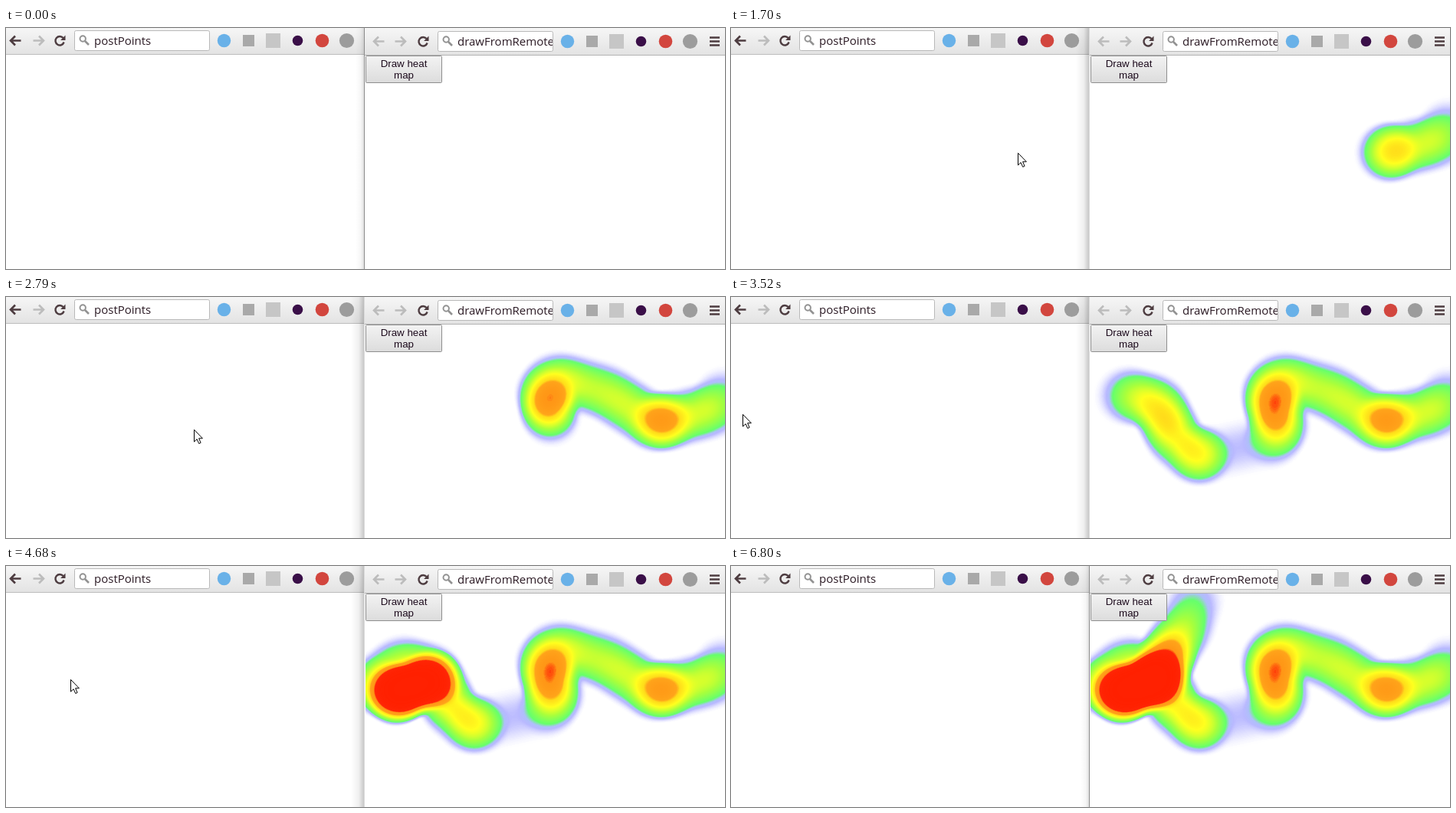
An HTML page with a canvas that plays this animation: 938x315 px, repeating every 6.88 s.

```html
<!DOCTYPE html>
<html lang="en">
<head>
<meta charset="utf-8">
<title>Heat map demo</title>
<style>
  html, body { margin: 0; width: 100%; height: 100%; overflow: hidden; background: #fff; }
  #stage { position: relative; width: 938px; height: 315px; overflow: hidden; }
  #heat { position: absolute; left: 469px; top: 36px; }
  svg { position: absolute; left: 0; top: 0; display: block; }
  .url { font: 15px "Open Sans", "Noto Sans", sans-serif; fill: #2b1a24; }
  .label { font: 13.33px "Liberation Sans", Arial, sans-serif; fill: #1c0a1c; text-anchor: middle; }
  .dark { color: #4d3c40; }
  .dim { color: #bcbcbc; }
  #button rect { fill: url(#face); stroke: #8e8e8e; }
  #button.hover rect { fill: url(#lit); stroke: #777; }
  #button.active rect { fill: #d9d9d9; stroke: #777; }
</style>
</head>
<body>
<div id="stage">
  <canvas id="heat" width="469" height="279"></canvas>
  <svg width="938" height="315" viewBox="0 0 938 315">
    <defs>
      <linearGradient id="bar" x2="0" y2="1">
        <stop stop-color="#f6f6f6"/><stop offset="1" stop-color="#e3e3e3"/>
      </linearGradient>
      <linearGradient id="face" x2="0" y2="1">
        <stop stop-color="#f3f3f3"/><stop offset="1" stop-color="#dcdcdc"/>
      </linearGradient>
      <linearGradient id="lit" x2="0" y2="1">
        <stop stop-color="#f8f8f8"/><stop offset="1" stop-color="#e4e4e4"/>
      </linearGradient>
      <linearGradient id="shade">
        <stop stop-color="#000" stop-opacity="0"/>
        <stop offset=".6" stop-color="#000" stop-opacity=".06"/>
        <stop offset="1" stop-color="#000" stop-opacity=".22"/>
      </linearGradient>
      <clipPath id="field"><rect x="564" y="5" width="149" height="26"/></clipPath>
      <g id="arrow" fill="none" stroke="currentColor" stroke-width="2.6">
        <path d="M7.5 0H-6M0 -6L-6 0L0 6"/>
      </g>
      <g id="reload" fill="none" stroke="currentColor" stroke-width="2.4">
        <path d="M4.6 -3.4A5.7 5.7 0 1 0 5.6 2"/>
        <path d="M7.5 -7V-.6H1.1Z" fill="currentColor" stroke="none"/>
      </g>
      <g id="lens" fill="none" stroke="#929292" stroke-width="2">
        <circle cx="-1.8" cy="-2" r="3.7"/><path d="M1 1L6 6" stroke-width="2.6"/>
      </g>
      <g id="extras">
        <circle cx="284.5" cy="16.5" r="8.7" fill="#69b1e8"/>
        <rect x="309" y="9" width="15" height="15" fill="#a9a9a9"/>
        <rect x="339" y="7" width="19" height="19" fill="#c6c6c6"/>
        <circle cx="380.5" cy="16.5" r="6.8" fill="#3a0f48"/>
        <circle cx="412.5" cy="16.5" r="8.8" fill="#d2463e"/>
        <circle cx="444.5" cy="16.5" r="9.6" fill="#9c9c9c"/>
      </g>
    </defs>

    <rect width="468" height="34" fill="url(#bar)"/>
    <path d="M0 34.5H468" stroke="#bdbdbd"/>
    <use href="#arrow" x="12" y="16.5" class="dark"/>
    <use href="#arrow" transform="translate(43 16.5) scale(-1 1)" class="dim"/>
    <use href="#reload" x="70" y="16.5" class="dark"/>
    <rect x="89.5" y="3.5" width="176" height="26" rx="2" fill="#fff" stroke="#b9b9b9"/>
    <use href="#lens" x="102" y="16"/>
    <text class="url" x="115" y="22">postPoints</text>
    <use href="#extras"/>

    <g id="rest">
      <rect x="456" width="11" height="315" fill="url(#shade)" opacity=".55"/>
      <path d="M467.5 0V315" stroke="#8c8c8c"/>
    </g>
    <g id="focus">
      <rect x="450" width="17" height="315" fill="url(#shade)"/>
      <path d="M467.5 0V315" stroke="#dcdcdc"/>
    </g>

    <rect x="468" width="470" height="35" fill="url(#bar)"/>
    <path d="M468 35.5H938" stroke="#b2b2b2"/>
    <use href="#arrow" x="486" y="17.5" class="dim"/>
    <use href="#arrow" transform="translate(515 17.5) scale(-1 1)" class="dim"/>
    <use href="#reload" x="544" y="17.5" class="dark"/>
    <rect x="563.5" y="4.5" width="150" height="26" rx="2" fill="#fff" stroke="#b9b9b9"/>
    <use href="#lens" x="576" y="17"/>
    <g clip-path="url(#field)"><text class="url" x="589" y="23">drawFromRemote</text></g>
    <use href="#extras" x="448" y="1"/>
    <path d="M918 12.5H931M918 17.5H931M918 22.5H931" stroke="#4d3c40" stroke-width="2.6"/>

    <g id="button">
      <rect x="469.5" y="36.5" width="99" height="35" rx="1"/>
      <text class="label" x="519" y="51">Draw heat</text>
      <text class="label" x="519" y="66">map</text>
    </g>
    <path id="cursor" d="M.5 .5V16.2L4.1 12.8L6.7 18.6L9.1 17.5L6.6 11.8H11.4Z"
          fill="#fff" stroke="#000"/>
  </svg>
</div>
<script>
const LOOP = 6880, STEP = 77, LAG = 90, W = 469, H = 279, TOP = 36;
const RADIUS = 44, HEAT_PER_MS = .006, SAMPLE = 4;
const $ = id => document.getElementById(id);
const ctx = $('heat').getContext('2d');

// The screen updates every STEP ms, restarting at each of these times
const restarts = [150, 850, 1010, 1700, 2420, 3120, 3820, 4580, 5280, 6800];

// Pointer key points: time, x, y
const keys = [
  [150, 769, 281], [780, 506, 62], [1010, 506, 62], [1162, 497, 84], [1250, 469, 126],
  [1300, 456, 146], [1450, 398, 161], [1700, 374, 163], [1890, 374, 163], [2075, 312, 123],
  [2165, 271, 112], [2240, 248, 108], [2320, 234, 122], [2600, 240, 152], [2705, 248, 168],
  [2800, 235, 187], [2830, 150, 206], [2960, 134, 206], [3020, 111, 186], [3270, 87, 138],
  [3400, 46, 127], [3507, 14, 154], [3740, 38, 167], [4690, 88, 147], [5140, 102, 112],
  [5230, 114, 94], [5290, 126, 76], [5375, 148, 4]
];

// Back and forth over one spot, two and a half times
const scribbling = t => t > 3740 && t < 4690;
function scribble(t) {
  const swing = Math.cos((t - 3740) / 380 * 2 * Math.PI);
  return [63 - 25 * swing, 157 + 10 * swing];
}

function pointerAt(t) {
  if (scribbling(t)) return scribble(t);
  const i = keys.findIndex(k => k[0] > t);
  if (i < 1) return keys[i ? keys.length - 1 : 0].slice(1);
  const [t0, x0, y0] = keys[i - 1], [t1, x1, y1] = keys[i];
  const f = (t - t0) / (t1 - t0);
  return [x0 + (x1 - x0) * f, y0 + (y1 - y0) * f];
}

function lastUpdate(t) {
  const start = restarts.filter(s => s <= t).pop() || 0;
  return start && start + Math.floor((t - start + 5) / STEP) * STEP;
}

// Every move in the left page is posted and arrives LAG ms later
const drops = [];
for (let t = 1010; t < 5375; t += SAMPLE) {
  const [x, y] = pointerAt(t), [px, py] = pointerAt(t - SAMPLE);
  const moved = x !== px || y !== py;
  if (!moved || x > W || y < TOP) continue;
  const amount = HEAT_PER_MS * SAMPLE * (scribbling(t) ? 2 : 1);
  drops.push({ t: t + LAG, x, y: y - TOP, amount });
}

function makePalette() {
  const c = document.createElement('canvas');
  c.width = 256;
  c.height = 1;
  const g = c.getContext('2d'), ramp = g.createLinearGradient(0, 0, 256, 0);
  [[.004, '#fff'], [.1, '#b9b9ff'], [.14, '#aebffa'], [.2, '#66ff6c'], [.4, '#a8ff3c'],
   [.6, '#ffff1e'], [.72, '#ffdc1a'], [.76, '#ffa41a'], [.87, '#ff9616'], [.9, '#ff2606'],
   [1, '#ff2000']].forEach(([p, color]) => ramp.addColorStop(p, color));
  g.fillStyle = ramp;
  g.fillRect(0, 0, 256, 1);
  return new Uint32Array(g.getImageData(0, 0, 256, 1).data.buffer);
}

const palette = makePalette();
const image = ctx.createImageData(W, H);
const pixels = new Uint32Array(image.data.buffer);
const field = new Float32Array(W * H);

function addDrop({ x, y, amount }) {
  const x0 = Math.max(0, Math.ceil(x - RADIUS)), x1 = Math.min(W - 1, x + RADIUS);
  const y0 = Math.max(0, Math.ceil(y - RADIUS)), y1 = Math.min(H - 1, y + RADIUS);
  for (let py = y0; py <= y1; py++) {
    for (let px = x0; px <= x1; px++) {
      const k = 1 - ((px - x) ** 2 + (py - y) ** 2) / RADIUS ** 2;
      if (k > 0) field[py * W + px] += amount * k * k;
    }
  }
}

function drawHeat(t) {
  field.fill(0);
  for (const d of drops) if (d.t <= t) addDrop(d);
  for (let i = 0; i < field.length; i++) {
    pixels[i] = palette[Math.round(255 * (1 - Math.exp(-field[i])))];
  }
  ctx.putImageData(image, 0, 0);
}

function show(id, on) {
  $(id).style.display = on ? '' : 'none';
}

function draw(t) {
  const [x, y] = pointerAt(t);
  const visible = t >= 150 && t < 5430;
  const over = visible && x > W && x < 569 && y > TOP && y < 72;
  const focused = t >= 850 && t < 6800;
  $('cursor').setAttribute('transform', `translate(${Math.round(x)} ${Math.round(y)})`);
  $('button').setAttribute('class', !over ? '' : t >= 850 && t < 1010 ? 'active' : 'hover');
  show('cursor', visible);
  show('focus', focused);
  show('rest', !focused);
  drawHeat(t);
}

let shownTime = -1;
function tick() {
  const t = lastUpdate(performance.now() % LOOP);
  if (t !== shownTime) draw(shownTime = t);
  requestAnimationFrame(tick);
}
tick();
</script>
</body>
</html>
```
